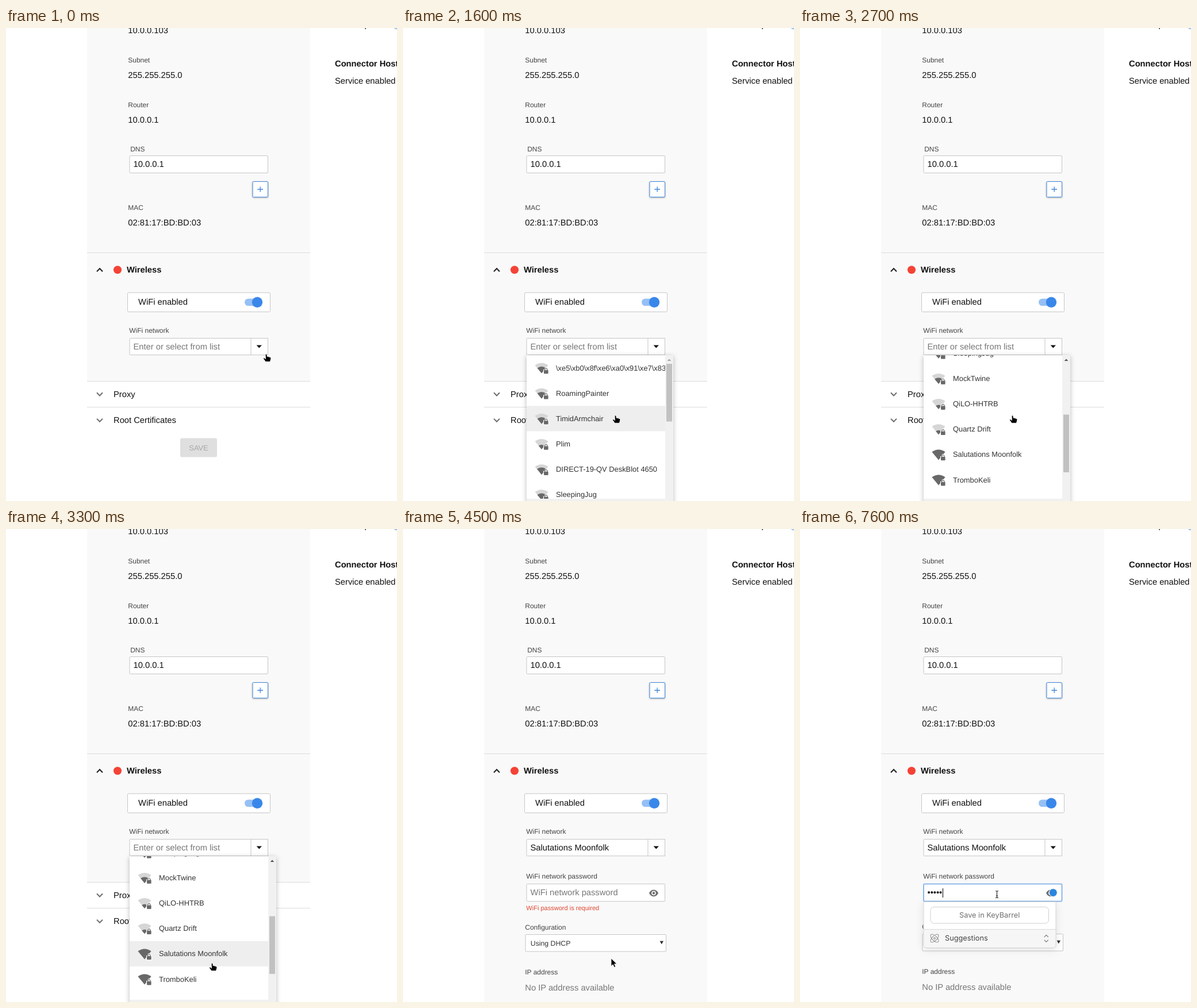
Write an HTML page that moves like this. It is 680 px wide and 824 px high and loops after 8 s.

```html
<!DOCTYPE html>
<html lang="en">
<head>
<meta charset="utf-8">
<title>WiFi settings</title>
<style>
html, body { margin: 0; width: 100%; height: 100%; overflow: hidden; background: #fff; }
svg { display: block; width: 680px; height: 824px; }
text { font: 14.72px "Liberation Sans", Arial, sans-serif; fill: #111; white-space: pre; text-rendering: geometricPrecision; }
.label { font-size: 11.96px; fill: #444; }
.bold { font-weight: bold; }
.hint { fill: #777; }
.item { font-size: 12.88px; fill: #333; }
.error { font-size: 11.04px; fill: #e0452f; }
.popup text { font: 12.75px Inter, sans-serif; fill: #444; }
.popup .strong { font-weight: 600; fill: #2b2b2b; }
.popup .small { font-size: 10.25px; fill: #666; }
.field { fill: #fff; stroke: #c6c6c6; }
.rule { stroke: #dcdcdc; }
.stroke { fill: none; stroke-width: 2; }
#list { filter: drop-shadow(0 2px 4px rgba(0,0,0,.27)); }
#popup { filter: drop-shadow(0 3px 7px rgba(0,0,0,.1)); }
#plus { filter: drop-shadow(0 1px 1.5px rgba(0,0,0,.3)); }
</style>
</head>
<body>
<svg viewBox="0 0 680 824">
  <defs>
    <clipPath id="rowsClip"><rect x="215" y="570" width="241" height="250"/></clipPath>
    <clipPath id="popupClip"><path d="M215 649H600V730H220Q215 730 215 725Z"/></clipPath>
  </defs>

  <rect id="panel" x="141" width="388" fill="#f9f9f9"/>
  <path class="rule" d="M141 391.5H529"/>

  <text x="212.3" y="9">10.0.0.103</text>
  <text class="label" x="212.3" y="60">Subnet</text>
  <text x="212.3" y="87">255.255.255.0</text>
  <text class="label" x="212.3" y="138">Router</text>
  <text x="212.3" y="165">10.0.0.1</text>
  <text class="label" x="216.2" y="214.5">DNS</text>
  <rect class="field" x="215" y="222.5" width="240.5" height="30" rx="1.5"/>
  <text x="221.5" y="242">10.0.0.1</text>
  <g id="plus">
    <rect x="429" y="267.5" width="26.5" height="27" rx="1.5" fill="#fff" stroke="#3f87dd"/>
    <path d="M437.3 281H447M442.2 276.2V285.8" stroke="#3f87dd" stroke-width="1.3"/>
  </g>
  <text class="label" x="212.3" y="317">MAC</text>
  <text x="212.3" y="344">02:81:17:BD:BD:03</text>

  <text x="623.4" y="-1">p</text>
  <circle cx="680" cy="-5" r="7.5" fill="#9cc3f5"/>
  <text class="bold" x="572" y="67">Connector Host</text>
  <text x="572" y="96.5">Service enabled</text>

  <path class="stroke" stroke="#222" d="M158 424.2 163 419 168 424.2"/>
  <circle cx="194" cy="421.2" r="7" fill="#f44336"/>
  <text class="bold" x="210" y="426" fill="#222">Wireless</text>
  <rect class="field" x="211.5" y="461" width="248" height="33.5" rx="2"/>
  <text x="230" y="482">WiFi enabled</text>
  <rect x="415" y="471.5" width="28" height="12.6" rx="6.3" fill="#95c0f5"/>
  <circle cx="437" cy="477.8" r="9.2" fill="#3a87ea"/>

  <text class="label" x="214.3" y="531">WiFi network</text>
  <rect class="field" x="215" y="540.5" width="240.5" height="29" rx="1.5"/>
  <rect id="arrowButton" x="426" y="540.5" width="29.5" height="29" stroke="#c6c6c6"/>
  <path d="M435.6 552.6H445L440.3 557.6Z" fill="#111"/>
  <text id="network" x="221.5" y="559.5"></text>

  <g id="collapsed">
    <path class="rule" d="M141 615.5H529M141 660.5H529"/>
    <path class="stroke" stroke="#707070" d="M158 635.3 163 640.5 168 635.3M158 680.6 163 685.8 168 680.6"/>
    <text x="187" y="642.5">Proxy</text>
    <text x="187" y="687.8">Root Certificates</text>
    <rect x="303" y="714.5" width="64" height="33" rx="3" fill="#dfdfdf"/>
    <text x="335" y="735.7" text-anchor="middle" style="font-size:12.88px;fill:#a8a8a8">SAVE</text>
  </g>

  <g id="expanded">
    <text class="label" x="214.3" y="609.3">WiFi network password</text>
    <rect id="password" class="field" x="215" y="618.3" width="240.5" height="30.4" rx="1.5"/>
    <path d="M428 634.3C431 626.5 441 626.5 444 634.3C441 642.1 431 642.1 428 634.3Z" fill="#707070"/>
    <circle cx="436" cy="634.3" r="3" fill="#707070" stroke="#fff" stroke-width="1.6"/>
    <text id="typed" x="221.5" y="637.7"></text>
    <rect id="caret" y="626" width="1" height="16"/>
    <text id="error" class="error" x="214.3" y="664">WiFi password is required</text>
    <g id="config">
      <text class="label" x="212.3" y="698">Configuration</text>
      <rect class="field" x="213" y="706.5" width="244.5" height="29.5" rx="1"/>
      <text x="221.8" y="725.6" style="font-size:12.27px;fill:#333">Using DHCP</text>
      <path d="M446.6 717.8H453L449.8 723.5Z" fill="#333"/>
      <text class="label" x="212.3" y="776">IP address</text>
      <text class="hint" x="212.3" y="803.7">No IP address available</text>
    </g>
    <circle id="manager" cx="440.3" cy="633.5" r="7" fill="#2b86de" stroke="#fff"/>
  </g>

  <g id="popup" class="popup">
    <path id="popupBack" stroke="#d6d6d6" fill="#fff"/>
    <g clip-path="url(#popupClip)">
      <path id="popupFoot" fill="#f6f6f6" stroke="#dadada"/>
    </g>
    <g id="suggest">
      <path d="M241 672 229 685.5" stroke="#85899c" stroke-width="6" stroke-linecap="round"/>
      <path d="M241 672 229 685.5" stroke="#c3c7d6" stroke-width="4" stroke-linecap="round"/>
      <circle cx="246.3" cy="667.5" r="9.8" fill="#b5bacd" stroke="#85899c"/>
      <circle cx="247" cy="666.8" r="6.6" fill="#c9cddd" stroke="#9ba0b3" stroke-width=".7"/>
      <text class="strong" x="266" y="669.6">Use Suggested Password</text>
      <text class="small" x="266.3" y="685">gaug!mix6PAIH</text>
    </g>
    <g id="save">
      <rect x="227" y="658.5" width="205.5" height="28.5" rx="6" fill="#fff" stroke="#cfcfcf"/>
      <text x="329.7" y="676.8" text-anchor="middle" style="fill:#707070">Save in KeyBarrel</text>
    </g>
    <g fill="none" stroke="#8a8a8a">
      <ellipse cx="234" cy="713" rx="9" ry="4.2" transform="rotate(45 234 713)"/>
      <ellipse cx="234" cy="713" rx="9" ry="4.2" transform="rotate(-45 234 713)"/>
      <circle cx="234" cy="713" r="1.5"/>
    </g>
    <text x="252" y="717.4">Suggestions</text>
    <path id="sorter" class="stroke" style="stroke-width:1.2" stroke="#777" d="M-3.5 -2.5 0 -6 3.5 -2.5M-3.5 2.5 0 6 3.5 2.5"/>
  </g>

  <g id="list">
    <rect x="215" y="570" width="255" height="270" fill="#fff"/>
    <g clip-path="url(#rowsClip)"><g id="rows"></g></g>
    <path d="M456 570H470V840H215V820H456Z" fill="#f1f1f1"/>
    <path id="upArrow" d="M459.7 580 463 576.5 466.3 580Z"/>
    <rect id="thumb" x="458" width="10" height="100.5" fill="#c1c1c1"/>
  </g>

  <g id="cursor" stroke="#fff" stroke-width=".8" stroke-linejoin="round">
    <path id="arrow" d="M0 0V13.5L3.2 10.7 5.3 15.5 7.7 14.4 5.6 9.8H10Z"/>
    <path id="hand" d="M-1.4 1Q0 -1 1.4 1L1.7 4.4Q3.2 3.5 4 4.9Q5.4 4.1 6.2 5.5Q8.4 5 8.4 7L7.8 10 6.8 13.3H-1.2L-4.9 8Q-5 6.2 -3 6.9L-1 8.6Z"/>
    <path id="ibeam" d="M-2.5 -6Q0 -6 0 -4.8Q0 -6 2.5 -6M0 -5V5M-2.5 6Q0 6 0 4.8Q0 6 2.5 6M-1.5 2.5H1.5" fill="none" stroke="#222" stroke-width="1.1"/>
  </g>
</svg>

<script>
const LOOP = 8000, STEP = 100, ROW = 44.16;
const CHOSEN = "Salutations Moonfolk";
const $ = id => document.getElementById(id);
const set = (id, attrs) => { for (const k in attrs) $(id).setAttribute(k, attrs[k]); };
const show = (id, on) => { $(id).style.display = on ? "" : "none"; };
const clamp = v => Math.max(0, Math.min(1, v));
// Latest entry whose time has come.
const at = (track, t) => track.filter(k => k[0] <= t).pop();

// [name, signal strength]
const networks = [
  ["\\xe5\\xb0\\x8f\\xe6\\xa0\\x91\\xe7\\x83\\xad", .65], ["RoamingPainter", .65],
  ["TimidArmchair", .65], ["Plim", .45], ["DIRECT-19-QV DeskBlot 4650", .7],
  ["SleepingJug", .65], ["MockTwine", .6], ["QiLO-HHTRB", .42],
  ["Quartz Drift", .42], [CHOSEN, 1], ["TromboKeli", 1]
];
const fan = "M0 0L-11.5 -14Q0 -22 11.5 -14Z";
$("rows").innerHTML = networks.map(([name, level], i) => `
  <g transform="translate(215 ${570 + i * ROW})">
    <rect class="row" width="241" height="${ROW}" fill="#eee"/>
    <g transform="translate(26 31.5)">
      <path d="${fan}" fill="#d6d6d6"/>
      <path d="${fan}" fill="#686868" transform="scale(${level})"/>
      <path d="M3 -6.5H5V-8Q7.7 -13 10.6 -8V-6.5H12.5V2H3Z" fill="#fff"/>
      <rect x="4" y="-5.5" width="7.6" height="6.3" rx=".8" fill="#686868"/>
      <path d="M5.7 -5V-7Q7.8 -10.4 9.9 -7V-5" fill="none" stroke="#686868" stroke-width="1.2"/>
    </g>
    <text class="item" x="51" y="26.5">${name}</text>
  </g>`).join("");
const rowRects = document.querySelectorAll(".row");

const pointer = [
  [0, "hand", 452.5, 568], [100, "hand", 449, 565], [200, "hand", 443, 559], [300, "hand", 440, 556],
  [700, "arrow", 440, 555], [1400, "hand", 428, 584], [1500, "hand", 394, 642], [1600, "hand", 369.5, 675],
  [3200, "hand", 366, 702], [3300, "hand", 358.5, 756.5], [3400, "hand", 358, 757],
  [3600, "hand", 360.5, 751], [3700, "hand", 362, 748.5], [4000, "arrow", 362, 748],
  [4900, "arrow", 359, 724], [5000, "arrow", 348, 664], [5100, "ibeam", 342.5, 636.5]
];
const scrolling = [[0, 0], [2000, 30], [2100, 72], [2300, 98.5], [2400, 126], [2600, 200], [2700, 246.5], [2900, 249.5]];
const hovering = [[0, -1], [1400, 0], [1500, 1], [1600, 2], [3200, 8], [3300, 9]];
const typing = [[0, 0], [6300, 1], [6900, 2], [7200, 3], [7400, 4], [7600, 5]];

function drawList(t) {
  const opacity = t < 4000 ? 1 - (1 - clamp((t - 650) / 550)) ** 3 : clamp((4500 - t) / 600);
  const scroll = at(scrolling, t)[1], hover = at(hovering, t)[1];
  show("list", t >= 700 && t < 4500);
  $("list").style.opacity = opacity;
  set("rows", { transform: `translate(0 ${-scroll})` });
  set("thumb", { y: 585 + scroll * .359 });
  set("upArrow", { fill: scroll ? "#505050" : "#a3a3a3" });
  rowRects.forEach((r, i) => r.setAttribute("opacity", i === hover ? 1 : 0));
}

function drawForm(t) {
  const chosen = t >= 4000, focused = t >= 5500, count = at(typing, t)[1];
  set("panel", { height: chosen ? 824 : 615 });
  show("collapsed", !chosen);
  show("expanded", chosen);
  set("arrowButton", { fill: t >= 700 && t < 1400 ? "#e3e3e3" : "#fff" });
  $("network").textContent = chosen ? CHOSEN : "Enter or select from list";
  set("network", { class: chosen ? "" : "hint" });

  $("password").style.cssText = focused ? "stroke:#82b1ea;stroke-width:1.8" : "";
  show("manager", focused);
  show("error", !count);
  set("config", { transform: `translate(0 ${count ? -1 : 0})` });
  $("typed").textContent = count ? "•".repeat(count) : "WiFi network password";
  set("typed", { class: count ? "" : "hint" });
  set("caret", { x: Math.round(222 + count * 5.15) });
  show("caret", count || (t >= 5600 && t < 6100));

  const right = count ? 445 : 448;
  show("popup", t >= 5600);
  show("suggest", !count);
  show("save", count);
  set("popupBack", { d: `M215 649.5H${right}V725Q${right} 730 ${right - 5} 730H220Q215 730 215 725Z` });
  set("popupFoot", { d: `M215 697.5H${right}V725Q${right} 729.5 ${right - 5} 729.5H220Q215 729.5 215 725Z` });
  set("sorter", { transform: `translate(${right - 16.7} 713.3)` });
}

function drawCursor(t) {
  const [, kind, x, y] = at(pointer, t);
  for (const k of ["arrow", "hand", "ibeam"]) show(k, k === kind);
  set("cursor", { transform: `translate(${x} ${y})` });
}

const start = performance.now();
function frame(now) {
  const t = Math.floor((Math.max(0, now - start) % LOOP) / STEP) * STEP;
  drawList(t);
  drawForm(t);
  drawCursor(t);
  requestAnimationFrame(frame);
}
frame(start);
</script>
</body>
</html>
```
